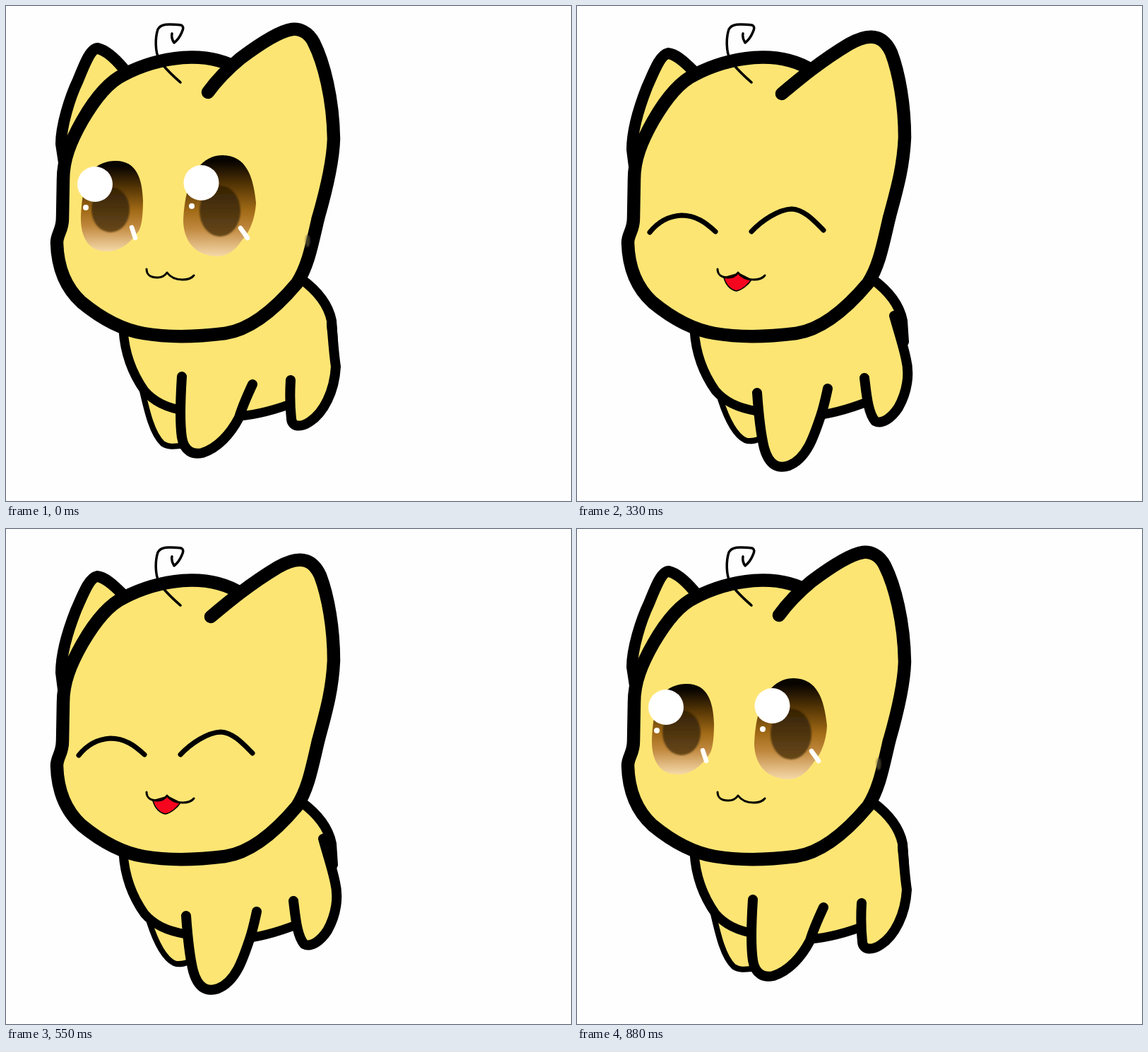
Animation of 800x700 px, one loop 990 ms. Source, as an HTML page without scripts:

```html
<!DOCTYPE html>
<html lang="en">
<head>
<meta charset="utf-8">
<title>Blinking yellow cat</title>
<style>
html, body { margin: 0; width: 100%; height: 100%; overflow: hidden; background: #fefefe; }
svg { display: block; width: 100vw; height: 100vh; }
.ink { fill: #fde573; stroke: #000; stroke-linecap: round; stroke-linejoin: round; }
.line { fill: none; }
.w { fill: #fff; }
.dash { stroke: #fff; stroke-width: 6.5; }

/* nine beats of 110 ms: the pose goes out, peaks at the fifth, and comes back */
.show, .eyes, .stretch { animation: 990ms step-end infinite; }
.ends { animation-name: ends; }
.near-ends { animation-name: near-ends; }
.middle { animation-name: middle; }
.outer { animation-name: outer; }
.half { animation-name: half; }
.shut { animation-name: shut; }
.peak { animation-name: peak; }
.closed { animation-name: closed; }
.eyes { animation-name: squash; }
.stretch { animation-name: stretch; }
@keyframes ends { 0%, 88.88% { visibility: visible } 11.11% { visibility: hidden } }
@keyframes near-ends { 0%, 22.22%, 88.88% { visibility: hidden } 11.11%, 77.77% { visibility: visible } }
@keyframes middle { 0%, 77.77% { visibility: hidden } 22.22% { visibility: visible } }
@keyframes outer { 0%, 66.66% { visibility: visible } 33.33% { visibility: hidden } }
@keyframes half { 0%, 33.33%, 77.77% { visibility: hidden } 22.22%, 66.66% { visibility: visible } }
@keyframes shut { 0%, 44.44%, 66.66% { visibility: hidden } 33.33%, 55.55% { visibility: visible } }
@keyframes peak { 0%, 55.55% { visibility: hidden } 44.44% { visibility: visible } }
@keyframes closed { 0%, 66.66% { visibility: hidden } 33.33% { visibility: visible } }
@keyframes squash {
  0%, 88.88% { transform: none; visibility: visible }
  11.11%, 77.77% { transform: matrix(1, 0, 0, .81, 0, 68); visibility: visible }
  22.22%, 66.66% { transform: matrix(1, 0, 0, .705, 0, 103.5); visibility: visible }
  33.33% { visibility: hidden }
}
@keyframes stretch {
  0%, 22.22%, 88.88% { transform: none }
  11.11%, 77.77% { transform: scaleY(1.007) }
}
</style>
</head>
<body>
<svg viewBox="0 0 800 700">
  <defs>
    <linearGradient id="iris" x2="0" y2="1">
      <stop offset=".06" stop-color="#080400"/>
      <stop offset=".3" stop-color="#573705"/>
      <stop offset=".55" stop-color="#a26b17"/>
      <stop offset=".72" stop-color="#bf873c"/>
      <stop offset=".88" stop-color="#dfb67c"/>
      <stop offset="1" stop-color="#f4d9a8"/>
    </linearGradient>
    <linearGradient id="pupil" x2="0" y2="1">
      <stop stop-color="#352203"/>
      <stop offset="1" stop-color="#68481a"/>
    </linearGradient>
    <filter id="soft"><feGaussianBlur stdDeviation="1.2"/></filter>
  </defs>

  <!-- far leg, its open ends tucked under the torso and the front leg -->
  <g class="ink" stroke-width="8">
    <path class="show ends" d="M225 545L192 540C200 575 207 605 222 619C230 624 238 623 247 622L268 570"/>
    <path class="show near-ends" d="M225 545L193 545C200 575 207 605 222 621C230 628 240 627 252 626L268 570"/>
    <path class="show half" d="M225 545L190 540C200 580 212 605 225 617C235 623 250 617 260 612L268 570"/>
    <path class="show shut" d="M225 545L203 556C214 590 226 608 238 614C246 617 254 614 260 612L268 570"/>
    <path class="show peak" d="M225 545L215 566C224 592 234 610 248 613L260 613L268 570"/>
  </g>

  <!-- torso -->
  <g class="ink stretch" stroke-width="14">
    <path stroke="none" d="M166 458C168 490 179 520 196 544C209 559 226 568 255 573L340 580L410 558L461 445L418 386Z"/>
    <path class="line" stroke-width="13" d="M166 458C168 490 179 520 196 544C209 559 226 568 255 573"/>
    <path class="line" stroke-width="13" d="M330 580C355 578 385 570 413 559"/>
    <path class="line" d="M418 386C440 402 456 420 461 445L463 475"/>
  </g>

  <!-- near legs -->
  <g class="ink" stroke-width="14">
    <g class="show ends">
      <path d="M461 450C463 470 464 490 467 510C465 545 450 575 430 588C418 596 405 596 404 584C402 565 402 545 403 529"/>
      <path d="M249 524C247 555 246 590 249 610C252 630 265 635 278 632C300 625 318 605 330 582C335 565 342 550 349 535"/>
    </g>
    <g class="show near-ends">
      <path d="M454 445L462 482C466 500 466 520 463 535C455 565 440 585 425 591C412 597 407 590 406 575L402 530"/>
      <path d="M249 536C248 570 250 600 254 622C259 645 272 646 285 643C305 637 322 615 335 587C343 565 346 550 349 539"/>
    </g>
    <g class="show middle">
      <path d="M449 438C455 460 462 480 466 500C471 520 468 545 455 568C445 583 432 592 422 587C412 575 410 550 407 526"/>
      <path d="M255 547C257 575 260 605 265 625C272 650 285 655 300 650C325 640 335 610 345 580C350 565 353 550 355 541"/>
    </g>
  </g>

  <!-- head -->
  <g class="ink stretch" stroke-width="18.5">
    <g stroke-width="16">
      <path class="show outer" d="M166 88C155 75 143 63 130 60C120 60 112 80 102 105C90 130 78 170 78 195L83 228"/>
      <path class="show shut" d="M164 91C152 79 140 68 129 67C118 69 110 90 99 115C88 143 78 175 78 203L82 235"/>
      <path class="show peak" d="M162 93C150 84 135 72 128 75C115 82 107 103 96 125C86 152 78 180 78 208L81 240"/>
    </g>
    <path d="M334 92C310 76 280 71 250 73C215 76 190 85 167 97C143 108 123 136 108 162C91 192 81 217 81 245L80 300C80 318 72 322 72 335C73 370 84 398 107 419C135 442 165 458 195 463C230 469 270 468 310 463C345 458 380 430 412 392C428 367 433 338 442 300"/>
    <g class="show outer">
      <path d="M286 122C299 104 315 88 332 74C356 56 385 36 405 33C415 32 428 36 436 52C450 80 463 130 464 188C463 220 455 255 442 300"/>
      <ellipse cx="427" cy="332" rx="3.5" ry="9" fill="#6b6340" opacity=".6" stroke="none" filter="url(#soft)"/>
    </g>
    <path class="show shut" d="M290 124C315 103 345 78 385 54C420 34 436 46 445 66C456 95 464 140 464 186C462 230 452 262 442 300"/>
    <path class="show peak" d="M293 125C320 105 360 75 400 60C430 48 445 55 452 75C459 100 463 140 463 185C461 230 448 265 437 297C430 320 420 335 414 346"/>
    <path class="line" stroke-width="3.5" d="M247 108C238 100 224 88 217 76C211 65 211 45 215 33C219 25 230 25 248 27C252 29 251 33 249 37C246 44 242 49 238 52C236 49 234 44 235 39"/>
  </g>

  <!-- eyes -->
  <g class="eyes">
    <path fill="url(#iris)" d="M154 219C185 218 193 245 194 275C194 290 193 310 188 318C175 337 160 347 143 347C115 347 106 325 106 300C107 270 112 240 125 230C132 223 143 219 154 219"/>
    <path fill="url(#iris)" d="M307 211C340 212 350 240 354 278C353 300 345 320 335 330C325 345 315 353 300 354C265 353 252 330 251 305C252 275 258 245 275 225C285 215 295 211 307 211"/>
    <g fill="url(#pupil)" filter="url(#soft)">
      <ellipse cx="148" cy="288" rx="27" ry="32"/>
      <ellipse cx="303" cy="290" rx="29" ry="36"/>
    </g>
    <circle class="w" cx="126" cy="252" r="25"/>
    <circle class="w" cx="276.500" cy="250" r="25"/>
    <circle class="w" cx="113" cy="285" r="4"/>
    <circle class="w" cx="263" cy="283" r="4"/>
    <path class="dash" stroke-linecap="round" d="M178 313L183 328M332 314L342 328"/>
  </g>
  <path class="ink line show closed" stroke-width="7" d="M103 320C115 305 130 297 148 296C168 296 182 306 196 319M247 319C262 303 285 288 304 287C322 288 336 304 349 317"/>

  <!-- mouth -->
  <g fill="#f6051f" stroke="#000" stroke-width="1.6">
    <path class="show near-ends" d="M209 387C214 395 220 397 230 397C238 396 244 393 247 389L229 381Z"/>
    <path class="show half" d="M208 384C212 396 220 400 228 400C237 399 244 392 247 387L229 378Z"/>
    <path class="show shut" d="M208 384C211 396 219 402 226 403C235 401 243 393 247 387L229 378Z"/>
    <path class="show peak" d="M208 384C210 396 218 404 225 405C233 403 242 394 247 387L229 378Z"/>
  </g>
  <path class="ink line stretch" stroke-width="3" d="M199 372C199 380 205 384 214 384C222 384 226 380 228 377C233 384 242 387 250 387C258 387 263 385 266 381"/>
</svg>
</body>
</html>
```
